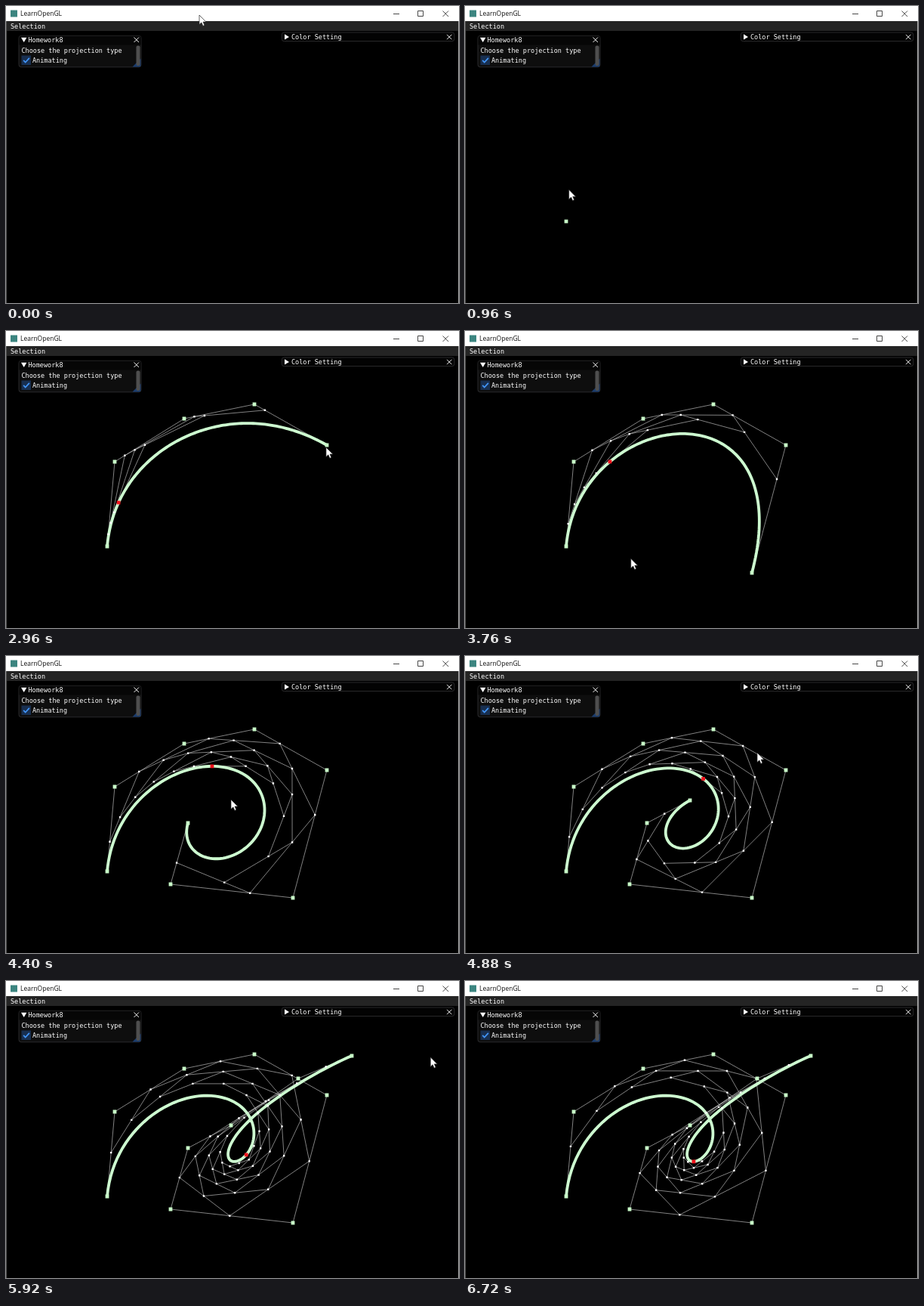
Write an HTML page that moves like this. It is 600 px wide and 393 px high and loops after 6.8 s.

```html
<!DOCTYPE html>
<html lang="en">
<head>
<meta charset="utf-8">
<title>Bezier curve editor</title>
<style>
  html, body { margin: 0; width: 100%; height: 100%; overflow: hidden; background: #000; }
  svg { display: block; width: 600px; height: 393px; }
  .ui { font: 8.5px "DejaVu Sans Mono", monospace; fill: #fff; }
  .caption { font: 8.5px "Open Sans", "Noto Sans", sans-serif; fill: #111; }
  .panel { fill: #0e0e0e; stroke: #343436; stroke-width: .8; }
  .cross { fill: none; stroke: #eee; }
  .system { fill: none; stroke: #333; stroke-width: .9; }
</style>
</head>
<body>
<svg viewBox="0 0 600 393">
  <rect width="600" height="393"/>

  <path id="mesh" fill="none" stroke="#c8c8c8" stroke-width=".65"/>
  <path id="curve" fill="none" stroke="#cdfbd0" stroke-width="3.8"/>
  <path id="joints" fill="#fff"/>
  <path id="handles" fill="#c8fac8"/>
  <path id="tracer" fill="#f0141e"/>

  <rect y="20" width="600" height="13" fill="#242424"/>
  <rect width="600" height="20" fill="#fff"/>
  <rect x="6" y="5.5" width="9" height="9" fill="#3c8580"/>
  <text class="caption" x="19" y="13">LearnOpenGL</text>
  <path class="system" d="M513 10.5h8M545.5 6.5h7v7h-7zM578.5 6.5l7.5 7.5m0-7.5l-7.5 7.5"/>
  <text class="ui" x="6" y="30">Selection</text>
  <path d="M.5 20V393" stroke="#555"/>
  <path d="M599.5 20V393" stroke="#aaa"/>

  <rect class="panel" x="17" y="39.4" width="162" height="41.4" rx="3"/>
  <path d="M17.5 51.5V42q0-2.2 2.2-2.2H176.5q2.2 0 2.2 2.2v9.5z" fill="#060606"/>
  <path d="M20 41.8h7.4l-3.7 6.2z" fill="#fff"/>
  <text class="ui" x="29.5" y="47.7">Homework8</text>
  <path class="cross" d="M169.5 41.5l6.500 6.5m0-6.5l-6.5 6.5"/>
  <text class="ui" x="20.5" y="62">Choose the projection type</text>
  <rect x="20.5" y="65.5" width="12.5" height="12.5" fill="#182f50"/>
  <path d="M23.2 71.8l2.5 2.7 5.2-5.6" fill="none" stroke="#4296fa" stroke-width="1.7"/>
  <text class="ui" x="35" y="75">Animating</text>
  <path d="M178.5 69.5v8.5q0 2.5-2.5 2.5h-8.5z" fill="#1a3d70"/>
  <rect x="172.5" y="52.5" width="5" height="26.5" rx="2" fill="#4f4f4f"/>

  <rect class="panel" x="365.3" y="35" width="228.5" height="11.6" rx="3" style="fill:#030303"/>
  <path d="M369 37.3l6 3.6-6 3.6z" fill="#fff"/>
  <text class="ui" x="378" y="43.8">Color Setting</text>
  <path class="cross" d="M584 37.8l6.4 6.4m0-6.4l-6.4 6.4"/>

  <g id="cursor">
    <path d="M0-1V11.6L2.9 8.900 4.9 13.4 7 12.5 5.1 8.1H9z" fill="#fff" stroke="#222" stroke-width=".7"/>
  </g>
</svg>

<script>
const LOOP = 6800, STEP = 80, SAMPLES = 120;

// Control points: x, y and the time of the click that adds them
const controls = [
  [134, 285, 720], [144, 173, 1360], [236, 116, 1840], [329, 97, 2400],
  [425, 151, 2800], [380, 320, 3600], [218, 302, 3840], [241, 221, 4160],
  [298, 191, 4480], [387, 129, 5040], [458, 99, 5520]
];
const stops = [[256, 13, 0], ...controls, [607, 103, 6320]];

const $ = id => document.getElementById(id);
const setPath = (id, d) => $(id).setAttribute("d", d);
const mix = (a, b, u) => a.map((v, i) => v + (b[i] - v) * u);
const smooth = u => u * u * (3 - 2 * u);
const clamp = u => Math.min(1, Math.max(0, u));

// The mouse lingers after each click, glides on and settles before the next one
function mouseAt(time) {
  const next = stops.findIndex(stop => stop[2] > time);
  if (next < 0) return stops[stops.length - 1];
  const from = stops[next - 1], to = stops[next];
  const progress = (time - from[2]) / (to[2] - from[2]);
  return mix(from, to, smooth(clamp((progress - .15) / .55)));
}

// The tracer slows down as the curve gets costlier, and wraps at the end
const parameterAt = time => (.945 + .694 * Math.log(1 + .32 * (time / 1000 - 1.92))) % 1;

// De Casteljau: every level of points, from the controls to the curve point
function subdivide(points, u) {
  const levels = [points];
  while (points.length > 1) {
    points = points.slice(1).map((p, i) => mix(points[i], p, u));
    levels.push(points);
  }
  return levels;
}

const polyline = points => "M" + points.map(p => p.map(v => v.toFixed(2)).join(" ")).join("L");
const squares = (points, size) => points.map(([x, y]) =>
  `M${x - size / 2} ${y - size / 2}h${size}v${size}h${-size}z`).join("");

function bezier(points) {
  return Array.from({ length: SAMPLES + 1 }, (_, i) => subdivide(points, i / SAMPLES).pop()[0]);
}

function draw(time) {
  const points = controls.filter(c => c[2] <= time).map(([x, y]) => [x, y]);
  const hasCurve = points.length > 1;
  const levels = hasCurve ? subdivide(points, parameterAt(time)) : [];

  setPath("mesh", levels.slice(0, -1).map(polyline).join(""));
  setPath("curve", hasCurve ? polyline(bezier(points)) : "");
  setPath("joints", squares(levels.slice(1, -1).flat(), 2.4));
  setPath("handles", squares(points, 4.8));
  setPath("tracer", squares(levels.slice(-1).flat(), 4.8));

  const [x, y] = mouseAt(time);
  $("cursor").setAttribute("transform", `translate(${x} ${y})`);
}

const start = performance.now();
let shown = -1;

function tick() {
  const elapsed = (performance.now() - start) % LOOP;
  const time = Math.floor(elapsed / STEP) * STEP;
  if (time !== shown) draw(shown = time);
  requestAnimationFrame(tick);
}
tick();
</script>
</body>
</html>
```
